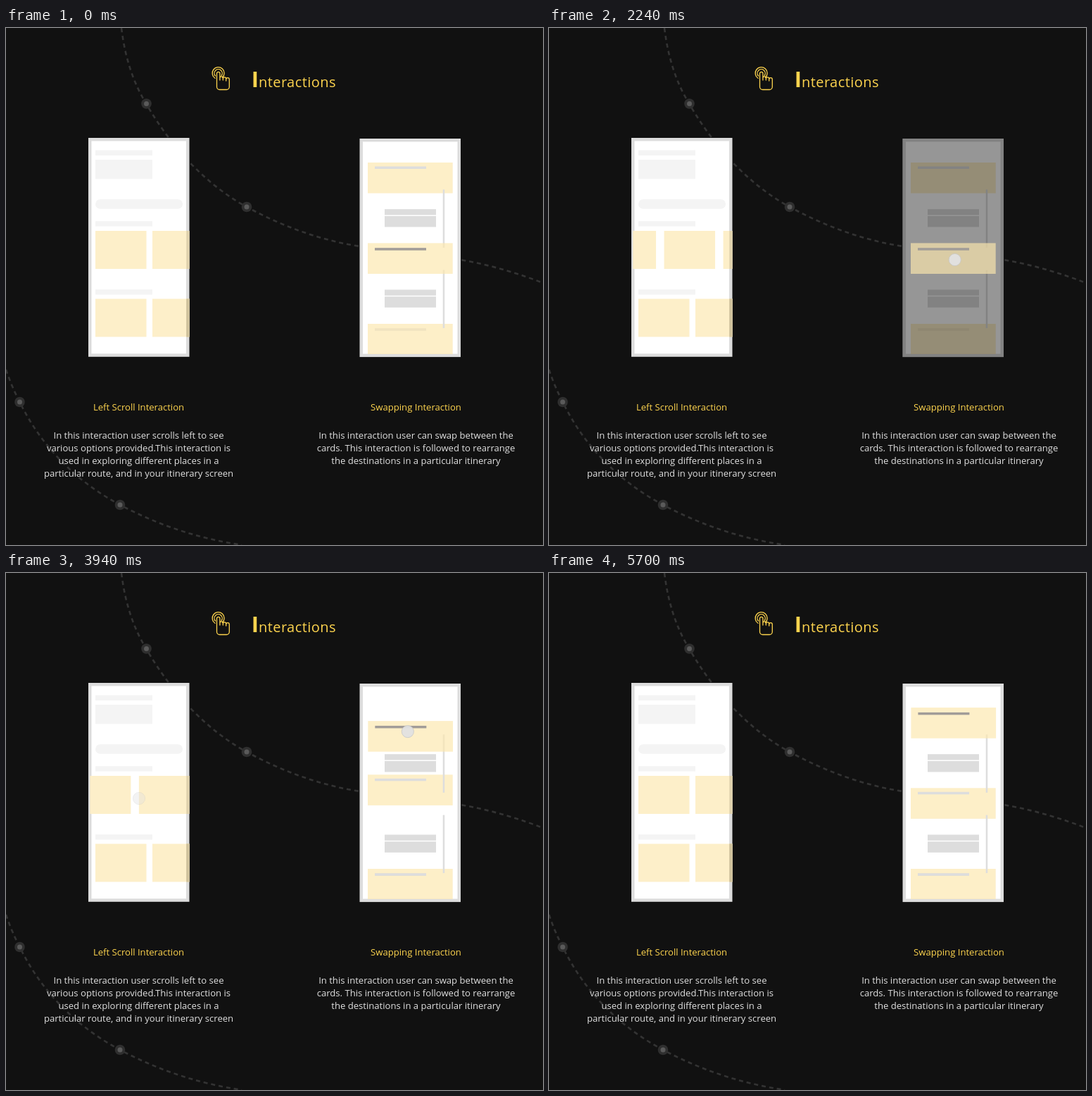
These frames come from a looping animation (763x734 px, 5.92 s). An HTML page:

```html
<!DOCTYPE html>
<html lang="en">
<head>
<meta charset="utf-8">
<title>Interactions</title>
<style>
  html, body { margin: 0; width: 100%; height: 100%; overflow: hidden; background: #111; }
  svg { display: block; width: 763px; height: 734px; }
  text { font: 13.1px "Open Sans", sans-serif; fill: #e0e0e0; text-anchor: middle; }
  .gold { fill: #fdd44e; }
  .title { font-size: 20px; letter-spacing: .45px; text-anchor: start; }
  .initial { font-size: 31px; font-weight: 700; text-anchor: start; }
  .trail { fill: none; stroke: #333; stroke-width: 2.6; stroke-dasharray: 6 5; }
  .icon { fill: none; stroke: #fdd44e; stroke-width: 1.3; stroke-linecap: round; stroke-linejoin: round; }
  .frame { fill: #fff; stroke: #ddd; stroke-width: 4.5; }
  .touch { fill: #e2e2e2; stroke: #c6c6c6; stroke-width: .8; }
  .swap { fill: rgb(252 231 173 / .67); }
</style>
</head>
<body>
<svg viewBox="0 0 763 734">
  <defs>
    <clipPath id="track"><rect x="119.3" y="280" width="141.2" height="170"/></clipPath>
    <clipPath id="edge"><rect x="256.3" y="280" width="4.2" height="170"/></clipPath>
  </defs>

  <g class="trail">
    <path d="M164 0C169 42 181 78 199 107C235 170 285 223 342 254C395 283 450 302 503 310C560 318 610 322 651 330C690 337 730 349 763 362"/>
    <path d="M0 485Q8 509 19.5 531C50 594 100 644 162 677C215 705 270 724 335 734"/>
  </g>
  <g id="dots"></g>

  <g class="icon">
    <path d="M297 71.3A8.5 8.5 0 1 1 307.5 70.3"/>
    <path d="M297.5 68A5.6 5.6 0 1 1 306.2 67.5"/>
    <path d="M299.5 82V64.5a2.2 2.2 0 0 1 4.4 0V74V71a2.2 2.2 0 0 1 4.4 0V74V72a2.2 2.2 0 0 1 4.4 0V75V73a2.2 2.2 0 0 1 4.6 0V83.5a4 4 0 0 1-4 4H303.5a4 4 0 0 1-4-4V75"/>
  </g>
  <text class="gold initial" x="348.7" y="84">I</text>
  <text class="gold title" x="359" y="83.7">nteractions</text>

  <rect class="frame" x="119.25" y="158.25" width="139" height="306.3"/>
  <g fill="#f4f4f4">
    <rect x="127" y="173.5" width="81" height="7.5"/>
    <rect x="127" y="187" width="81" height="27.3"/>
    <rect x="127" y="243.2" width="124" height="13.6" rx="6.8"/>
    <rect x="127" y="274.3" width="81" height="7.3"/>
    <rect x="127" y="371.2" width="81" height="7.3"/>
  </g>
  <g clip-path="url(#track)" fill="#fdefc9"><g id="cards"></g></g>
  <g clip-path="url(#edge)" fill="#e0d2ac"><use href="#cards"/></g>
  <rect x="256.3" y="384.5" width="4.2" height="54" fill="#d0c29c"/>
  <circle id="leftTouch" class="touch" r="8.6"/>

  <rect class="frame" x="504.75" y="159.25" width="139" height="305.6"/>
  <g id="topCard">
    <rect class="swap" x="514" y="191" width="120.7" height="43.6"/>
    <rect x="524" y="196.5" width="73" height="3.5" fill="#ddd"/>
  </g>
  <rect class="swap" x="514" y="420" width="120.7" height="43"/>
  <rect x="524" y="426.3" width="73" height="3.5" fill="#f1e3c0"/>
  <rect id="bottomLine" x="524" y="426.3" width="73" height="3.5" fill="#ddd"/>
  <g id="blocks" fill="#ddd"></g>
  <rect id="dim" x="502.5" y="157" width="143.5" height="310.1"/>
  <g id="middleCard">
    <rect class="swap" x="514" y="305.4" width="120.7" height="43.6"/>
    <rect x="524" y="312.2" width="73" height="3.5" fill="#a19c98"/>
  </g>
  <circle id="rightTouch" class="touch" r="8.6"/>

  <g id="copy"></g>
</svg>

<script>
const LOOP = 5920, RESET = 5600;
const ROW = 114.3, CARD_PITCH = 84;
const $ = id => document.getElementById(id);

function set(node, attrs) {
  for (const key in attrs) node.setAttribute(key, attrs[key]);
  return node;
}

function add(parent, name, attrs, content = '') {
  const node = document.createElementNS('http://www.w3.org/2000/svg', name);
  node.textContent = content;
  return parent.appendChild(set(node, attrs));
}

function dot(cx, cy) {
  add($('dots'), 'circle', { cx, cy, r: 7.3, fill: '#2f2f2f' });
  add($('dots'), 'circle', { cx, cy, r: 3.5, fill: '#5a5a5a' });
}
dot(199.5, 107.5);
dot(342, 254);
dot(19.5, 531);
dot(162, 677);

for (const y of [0, ROW]) {
  const block = (x, top, width, height) => add($('blocks'), 'rect', { x, y: top + y, width, height });
  block(538, 257.2, 73, 8.3);
  block(538, 267, 73, 15.5);
  block(620.7, 229.3, 2.5, 82.5);
}

function paragraph(x, heading, lines) {
  add($('copy'), 'text', { x, y: 543, class: 'gold' }, heading);
  lines.forEach((line, i) => add($('copy'), 'text', { x, y: 583 + 18 * i }, line));
}
paragraph(188.5, 'Left Scroll Interaction', [
  'In this interaction user scrolls left to see',
  'various options provided.This interaction is',
  'used in exploring different places in a',
  'particular route, and in your itinerary screen']);
paragraph(582.5, 'Swapping Interaction', [
  'In this interaction user can swap between the',
  'cards. This interaction is followed to rearrange',
  'the destinations in a particular itinerary']);

const addCard = (x, y) => add($('cards'), 'rect', { x, y, width: 72.5, height: 54 });
const scrollCards = Array.from({ length: 6 }, () => addCard(0, 288));
addCard(127, 384.5);
addCard(208, 384.5);

const ramp = (t, start, duration) => Math.min(1, Math.max(0, (t - start) / duration));
const mix = (a, b, p) => a + (b - a) * p;
const smooth = p => p * p * (3 - 2 * p);
const easeOut = p => 1 - (1 - p) ** 2;

// A flick decays exponentially, then a last swipe brings it to rest.
function flick(t) {
  const decay = Math.exp(-Math.max(0, t - 3212) / 705);
  return 1 - decay * (1 - smooth(ramp(t, 4620, 780)));
}

const scrollAt = t => 78 * easeOut(ramp(t, 1680, 1500)) + (3 * CARD_PITCH - 78) * flick(t);

const swipes = [
  { show: 1300, hide: 1800, move: 1700, time: 500, from: [162, 316], to: [149, 316], alpha: .9 },
  { show: 2640, hide: 3800, move: 3140, time: 260, from: [209, 318], to: [189, 320], alpha: .6 },
  { show: 4400, hide: 4850, move: 4620, time: 600, from: [201.5, 313], to: [175, 313], alpha: .45 }
];
const drags = [
  { show: 1500, hide: 4420, move: 3305, time: 980, from: [576.7, 329], to: [568.5, 184], alpha: .95 }
];

function placeTouch(id, gestures, t) {
  const g = gestures.filter(({ show }) => t >= show).pop() || gestures[0];
  const p = smooth(ramp(t, g.move, g.time));
  set($(id), {
    cx: mix(g.from[0], g.to[0], p),
    cy: mix(g.from[1], g.to[1], p),
    opacity: g.alpha * ramp(t, g.show, 400) * (1 - ramp(t, g.hide, 400))
  });
}

// Standard ease-in-out bezier (.42, 0, .58, 1).
function easeInOut(x) {
  let lo = 0, hi = 1;
  for (let i = 0; i < 20; i++) {
    const u = (lo + hi) / 2;
    const bx = 3 * u * (1 - u) * mix(.42, .58, u) + u ** 3;
    if (bx < x) lo = u; else hi = u;
  }
  return smooth(lo);
}

function render(t) {
  const rest = t >= RESET;
  const offset = rest ? 0 : scrollAt(t);
  const pitch = rest ? 81 : mix(81, CARD_PITCH, smooth(ramp(t, 1350, 300)));
  scrollCards.forEach((card, i) => set(card, { x: 127 + i * pitch - offset }));

  const swap = easeInOut(ramp(t, 3213, 1015));
  set($('topCard'), { transform: `translate(0 ${ROW * swap})` });
  set($('middleCard'), { transform: `translate(${.4 * swap} ${-ROW * swap})` });

  const release = smooth(ramp(t, 3140, 240));
  set($('dim'), { opacity: .5 * smooth(ramp(t, 1830, 560)) * (1 - release) });
  set($('bottomLine'), { opacity: release });

  placeTouch('leftTouch', swipes, t);
  placeTouch('rightTouch', drags, t);
}

const start = performance.now();
function tick() {
  render((performance.now() - start) % LOOP);
  requestAnimationFrame(tick);
}
render(0);
requestAnimationFrame(tick);
</script>
</body>
</html>
```
